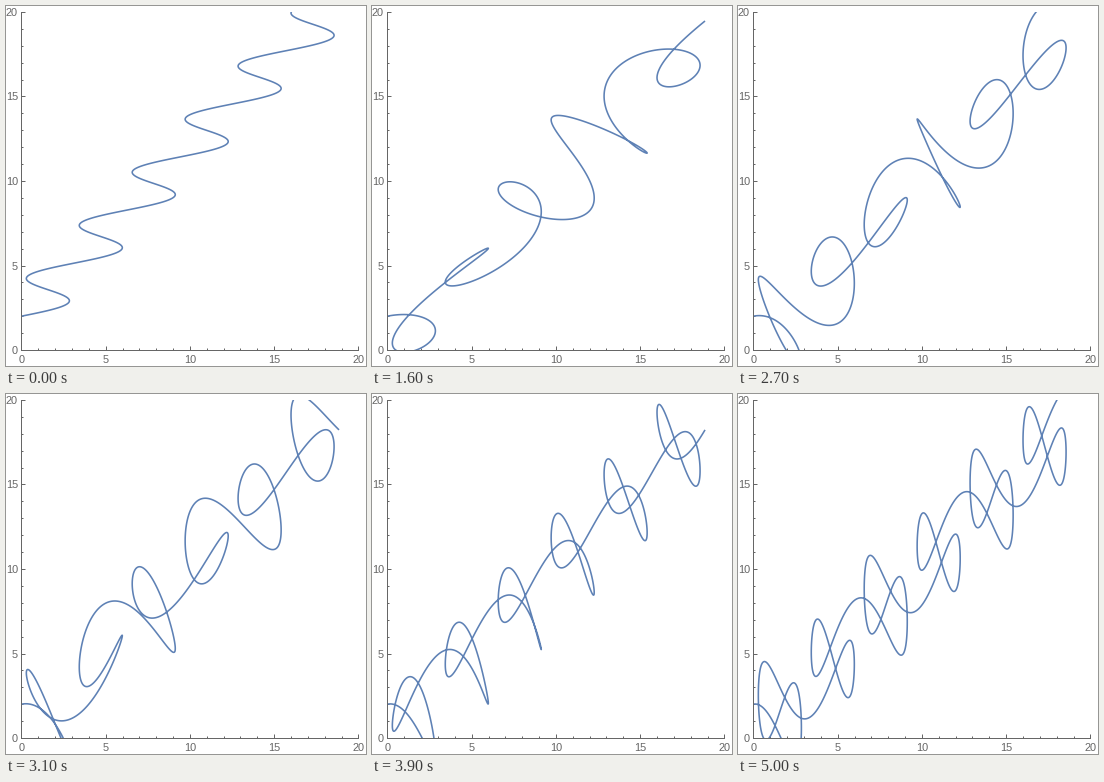
Animation of 360x360 px, one loop 5100 ms. Source, as a matplotlib script:

```python
import numpy as np
import matplotlib.pyplot as plt
from matplotlib.animation import FuncAnimation

SIZE = 360
FRAMES = 51
INTERVAL = 100
LEFT, RIGHT, TOP, BOTTOM = 15.4, 352.4, 6, 344  # plot area in pixels
LIMIT = 20
GRAY = "#666666"
BLUE = "#5e81b5"

plt.rcParams["font.family"] = "Liberation Sans"
plt.rcParams["path.simplify"] = False

# At 72 dpi one point equals one pixel.
fig = plt.figure(figsize=(SIZE / 72, SIZE / 72), dpi=72, facecolor="white")
ax = fig.add_axes([LEFT / SIZE, 1 - BOTTOM / SIZE,
                   (RIGHT - LEFT) / SIZE, (BOTTOM - TOP) / SIZE])
ax.set_xlim(0, LIMIT)
ax.set_ylim(0, LIMIT)
ax.patch.set_visible(False)

for side in ("top", "right"):
    ax.spines[side].set_visible(False)
for side in ("left", "bottom"):
    ax.spines[side].set(color=GRAY, linewidth=1)

majors = range(0, LIMIT + 1, 5)
for axis in (ax.xaxis, ax.yaxis):
    axis.set_ticks(majors, labels=[])
    axis.set_ticks(range(LIMIT + 1), minor=True)
ax.tick_params(which="major", direction="in", length=4, width=1, color=GRAY)
ax.tick_params(which="minor", direction="in", length=2.4, width=1, color=GRAY)


def label(text, x, baseline, align):
    fig.text(x / SIZE, 1 - baseline / SIZE, text, ha=align, va="baseline",
             size=11, color=GRAY)


for value in majors:
    share = value / LIMIT
    label(str(value), LEFT + share * (RIGHT - LEFT), 357, "center")
    label(str(value), 12, BOTTOM - share * (BOTTOM - TOP) + 4, "right")

t = np.linspace(0, 6 * np.pi, 2400)
x = t + 2 * np.sin(2 * t)
curve, = ax.plot([], [], color=BLUE, linewidth=1.6,
                 solid_capstyle="butt", solid_joinstyle="round")


def draw(frame):
    frequency = frame / 10
    curve.set_data(x, t + 2 * np.cos(frequency * t))
    return curve,


anim = FuncAnimation(fig, draw, frames=FRAMES, interval=INTERVAL,
                     repeat=True, repeat_delay=0)
plt.show()
```
